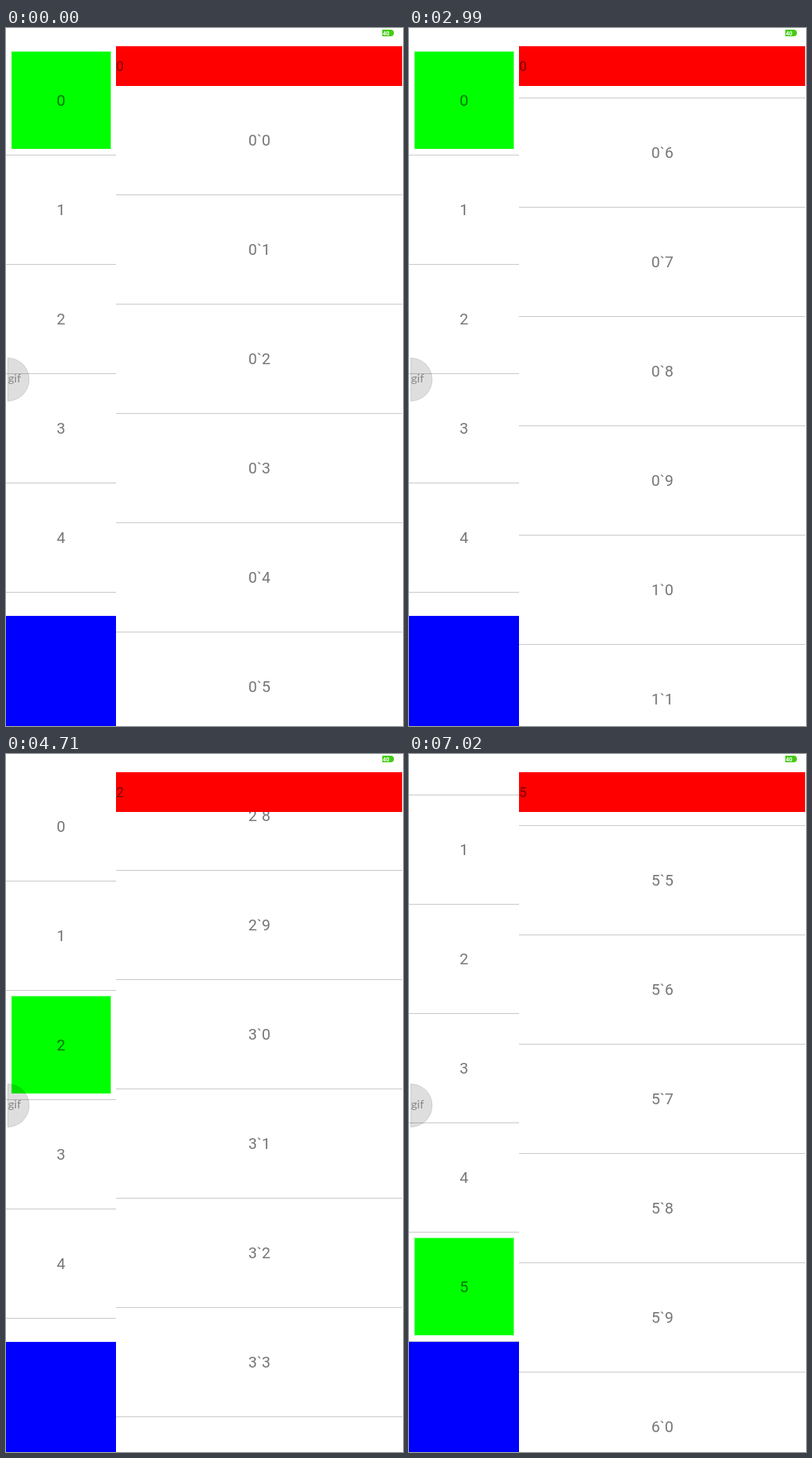
An HTML page for the animation above (8000 ms loop, 480 px wide and 843 px high).

```html
<!DOCTYPE html>
<html lang="en">
<head>
<meta charset="utf-8">
<title>Linked lists</title>
<style>
html, body { margin: 0; width: 100%; height: 100%; overflow: hidden; background: #fff; }
body { position: relative; font: 18.67px Roboto, sans-serif; color: rgba(0, 0, 0, .54); }
body > * { position: absolute; overflow: hidden; }
#menu { left: 0; top: 22px; width: 133px; height: 688px; }
#list { left: 133px; top: 70px; width: 346px; height: 773px; }
#list .row { text-indent: .67px; }
#head { left: 133px; top: 22px; width: 346px; height: 48px; background: #f00; font-size: 16px; line-height: 49px; text-indent: .33px; }
#foot { left: 0; top: 710px; width: 133px; height: 133px; background: #00f; }
.row { position: relative; box-sizing: border-box; height: 132px; line-height: 132px; text-align: center; border-bottom: 1px solid #ccc; }
/* the box edges fall between pixels, so its border is part green */
.on::before {
  content: ''; position: absolute; z-index: -1; left: 6px; top: 6px; width: 119px; height: 117px;
  background: #0f0 padding-box; border: solid rgba(0, 255, 0, .5); border-width: 1px 1px 0;
  border-left-color: rgba(0, 255, 0, .33); border-right-color: rgba(0, 255, 0, .67);
}
svg { left: 0; top: 0; }
</style>
</head>
<body>
<div id="menu"><div></div></div>
<div id="list"><div></div></div>
<div id="head"></div>
<div id="foot"></div>
<svg width="480" height="843">
  <path d="M2 398.5a26 26 0 0 1 0 52z" fill="#000" fill-opacity=".13" stroke="#000" stroke-opacity=".12"/>
  <text x="2.5" y="428" font-family="Lato, sans-serif" font-size="14" fill="#888">gif</text>
  <path d="M455 2h10a4 4 0 0 1 0 8h-10z" fill="#4c1"/>
  <text x="455.5" y="8.6" font-family="Roboto, sans-serif" font-size="7" font-weight="700" fill="#fff">40</text>
</svg>
<script>
const LOOP = 8000, ROW = 132;
// time, scroll offset, speed in px/ms, screen updates until the next key
const keys = [
  [1440, 3, .05, 8],
  [2240, 173, .45, 8],
  [2990, 777, 1.3, 12],
  [4130, 2751, 1.78, 12],
  [5270, 4791, 1.88, 7],
  [5960, 6165, 2, 6],
  [6530, 7215, .12, 5],
  [7020, 7243, 0, 1]
];

const menu = document.querySelector('#menu > div');
const list = document.querySelector('#list > div');
const head = document.getElementById('head');

function addRow(parent, text) {
  const row = document.createElement('div');
  row.className = 'row';
  row.textContent = text;
  parent.append(row);
}
for (let i = 0; i < 6; i++) addRow(menu, i);
for (let i = 0; i < 64; i++) addRow(list, Math.floor(i / 10) + '`' + i % 10);

function scrollAt(t) {
  if (t < keys[0][0]) return 0;
  const i = keys.findLastIndex(k => t >= k[0]);
  const [t0, s0, v0, n] = keys[i];
  if (i === keys.length - 1) return s0;
  const [t1, s1, v1] = keys[i + 1];
  const d = t1 - t0;
  const u = Math.floor((t - t0) / d * n) / n, w = 1 - u;
  return Math.round(w * w * (1 + 2 * u) * s0 + u * u * (3 - 2 * u) * s1
    + d * u * w * (w * v0 - u * v1));
}

function draw(t) {
  const s = scrollAt(t);
  const group = Math.floor(s / ROW / 10);
  list.style.transform = `translateY(${-s}px)`;
  menu.style.transform = `translateY(${-Math.max(0, (group + 1) * ROW - 688)}px)`;
  [...menu.children].forEach((row, i) => row.classList.toggle('on', i === group));
  head.textContent = group;
}

const start = performance.now();
function tick() {
  draw((performance.now() - start) % LOOP);
  requestAnimationFrame(tick);
}
tick();
</script>
</body>
</html>
```
